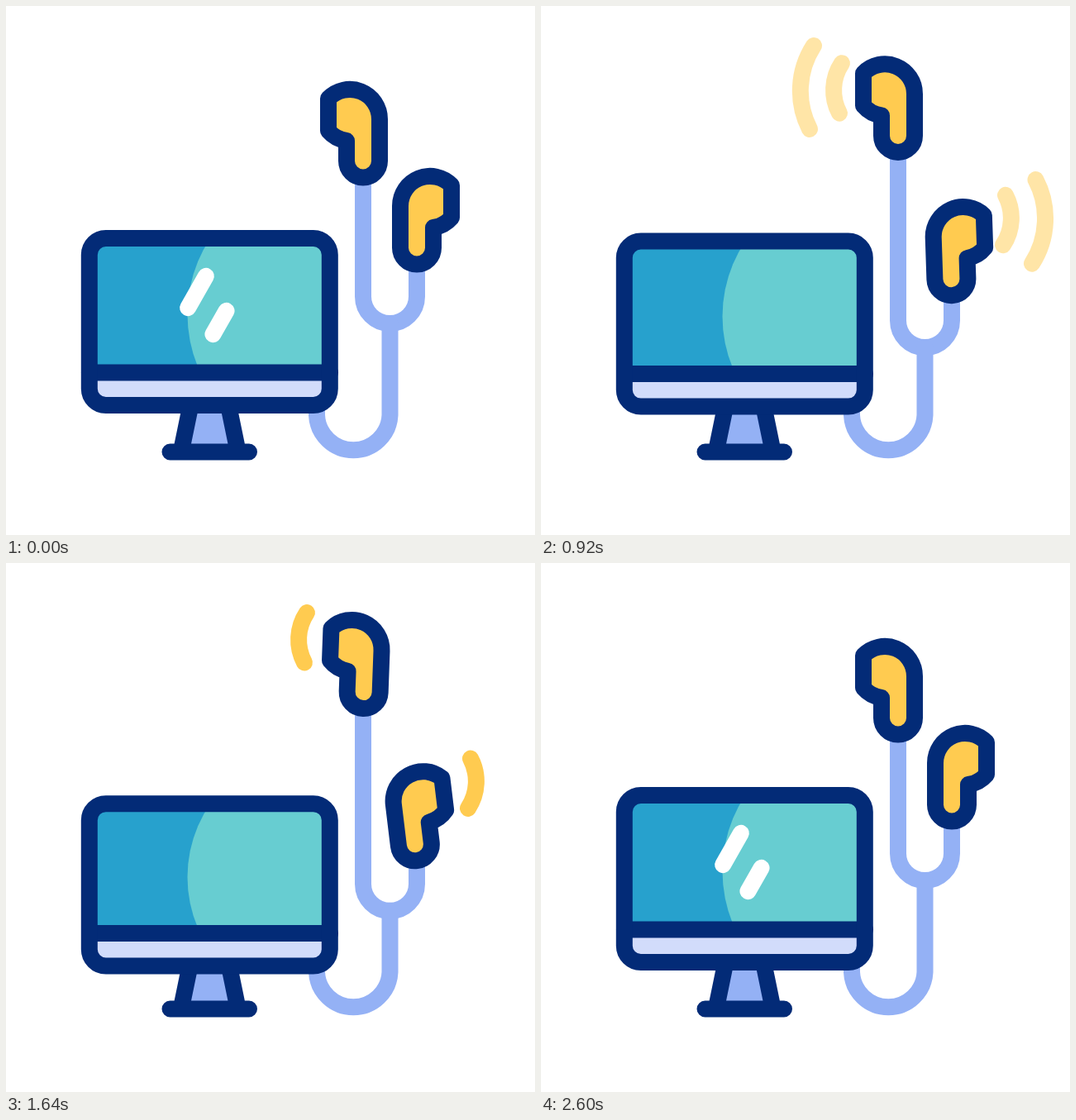
An HTML page that plays this animation: 640x640 px, repeating every 3000 ms.

```html
<!DOCTYPE html>
<html lang="en">
<head>
<meta charset="utf-8">
<title>Computer and earphones</title>
<style>
html, body { margin: 0; width: 100%; height: 100%; overflow: hidden; background: #fff; }
svg { display: block; width: 100vw; height: 100vh; }
.line { fill: none; stroke-width: 20; stroke-linecap: round; stroke-linejoin: round; }
.navy { stroke: #032b77; }
.cable { stroke: #94b1f5; }
.wave { stroke: #ffcb50; }
.glare { stroke: #fff; }
</style>
</head>
<body>
<svg viewBox="0 0 640 640">
  <defs>
    <clipPath id="screen"><rect id="screenBox" x="101" width="291"/></clipPath>
    <clipPath id="body"><rect id="bodyBox" x="101" width="291" rx="20"/></clipPath>
    <!-- earbud drawn around its hinge on the cable -->
    <path id="bud" class="line navy" style="fill:#ffcb50"
      d="M-42-93.5A36 36 0 0 1 20-68.5V-18A20 20 0 0 1-20-18V-42.5C-28-43.5-36-47.5-42-54.5Z"/>
  </defs>

  <g id="leftWaves">
    <path class="line wave far" d="M330 82.3A101 101 0 0 0 325 183.3"/>
    <path class="line wave near" d="M364 103.5A59 59 0 0 0 361 164"/>
  </g>
  <g id="rightWaves">
    <path class="line wave far" d="M598.5 181A101 101 0 0 1 594 282.5"/>
    <path class="line wave near" d="M562 199.7A59 59 0 0 1 559 260"/>
  </g>

  <path id="fork" class="line cable"/>
  <path id="trunk" class="line cable"/>
  <use id="leftBud" href="#bud"/>
  <use id="rightBud" href="#bud"/>

  <path d="M222 485H270L280 538H212Z" fill="#94b1f5"/>
  <path class="line navy" d="M223 485L212.5 536M269.500 485L280 536M198.500 539.500H294"/>

  <g clip-path="url(#body)">
    <rect x="101" y="270" width="291" height="230" fill="#d2dcfb"/>
    <g clip-path="url(#screen)">
      <rect x="101" y="270" width="291" height="190" fill="#27a1cd"/>
      <circle id="shade" cx="386.5" cy="373" r="167" fill="#67cdd1"/>
      <path id="glare1" class="line glare"/>
      <path id="glare2" class="line glare"/>
    </g>
  </g>
  <path id="divider" class="line navy"/>
  <rect id="frame" class="line navy" x="100.800" width="291" rx="20"/>
</svg>
<script>
const LOOP = 3000, STEP = 40;
const $ = id => document.getElementById(id);
const set = (id, attrs) => {
  for (const k in attrs) $(id).setAttribute(k, attrs[k]);
};
const clamp = u => Math.min(1, Math.max(0, u));
const ease = (t, a, b) => (1 - Math.cos(Math.PI * clamp((t - a) / (b - a)))) / 2;
const rise = (t, a, top, b) => t < top ? ease(t, a, top) : 1 - ease(t, top, b);
// n swings from 0 to 1 and back, starting at time a
const swing = (t, a, period, n) => {
  const u = (t - a) / period;
  return u <= 0 || u >= n ? 0 : (1 - Math.cos(2 * Math.PI * u)) / 2;
};

function drawMonitor(t) {
  const s = swing(t, 200, 880, 2);
  const top = 281 + 12.3 * s, low = 5.5 * s;
  const mid = 443.5 + low, bottom = 483 + low;
  set('frame', { y: top, height: bottom - top });
  set('bodyBox', { y: top, height: bottom - top });
  set('screenBox', { y: top, height: mid - top });
  set('divider', { d: `M101 ${mid}H392` });
  const k = (mid - top) / 162.5;
  set('shade', { transform: `translate(0 ${top - 281 * k}) scale(1 ${k})` });
}

// A slanted bar that slides by (dx, dy) per unit of k and grows as it leaves its place
function drawGlare(id, x, y, half, dx, dy, k) {
  const len = half + 18 * Math.abs(k);
  const cx = x + dx * k, cy = y + dy * k;
  const ex = 0.494 * len, ey = 0.869 * len;
  set(id, { d: `M${cx - ex} ${cy + ey}L${cx + ex} ${cy - ey}` });
}

function drawWaves(t, drop) {
  set('leftWaves', { transform: `translate(0 ${-1.18 * drop})` });
  set('rightWaves', { transform: `translate(0 ${drop})` });
  const fade = (cls, start) => document.querySelectorAll(cls).forEach(
    el => el.setAttribute('opacity', swing(t, start, 320, 7)));
  fade('.near', 200);
  fade('.far', 360);
}

function drawEarphones(t) {
  const slide = t < 1370 ? ease(t, 200, 1360) : 1 - ease(t, 1380, 2475);
  const drop = 42.5 * slide;
  const leftY = 205.5 - 40 * rise(t, 110, 1305, 2400);
  const rightY = 310.5 + 55 * slide;
  const leftTurn = 22 * swing(t, 120, 800, 3);
  const rightTurn = 20 * swing(t, 200, 800, 3);
  const bend = 351.5 + drop;
  set('leftBud', { transform: `translate(432 ${leftY}) rotate(${leftTurn})` });
  set('rightBud', { transform: `translate(497 ${rightY}) rotate(${-rightTurn}) scale(-1 1)` });
  set('fork', { d: `M432 ${leftY}V${bend}A32.5 32.5 0 0 0 497 ${bend}V${rightY}` });
  set('trunk', { d: `M464.5 ${bend + 32.5}V495A44.3 44.3 0 0 1 376 495V480` });
  drawWaves(t, drop);
}

function draw(t) {
  drawMonitor(t);
  const k = t < 1200 ? 5 * ease(t, 120, 1026) : -4.5 * (1 - ease(t, 1378, 2400));
  drawGlare('glare1', 231, 346, 22, 49.5, 33, k);
  drawGlare('glare2', 258.5, 383, 16.3, 54.5, 25, k);
  drawEarphones(t);
}

const start = performance.now();
function tick() {
  const t = (performance.now() - start) % LOOP;
  draw(Math.floor(t / STEP) * STEP);
  requestAnimationFrame(tick);
}
tick();
</script>
</body>
</html>
```
